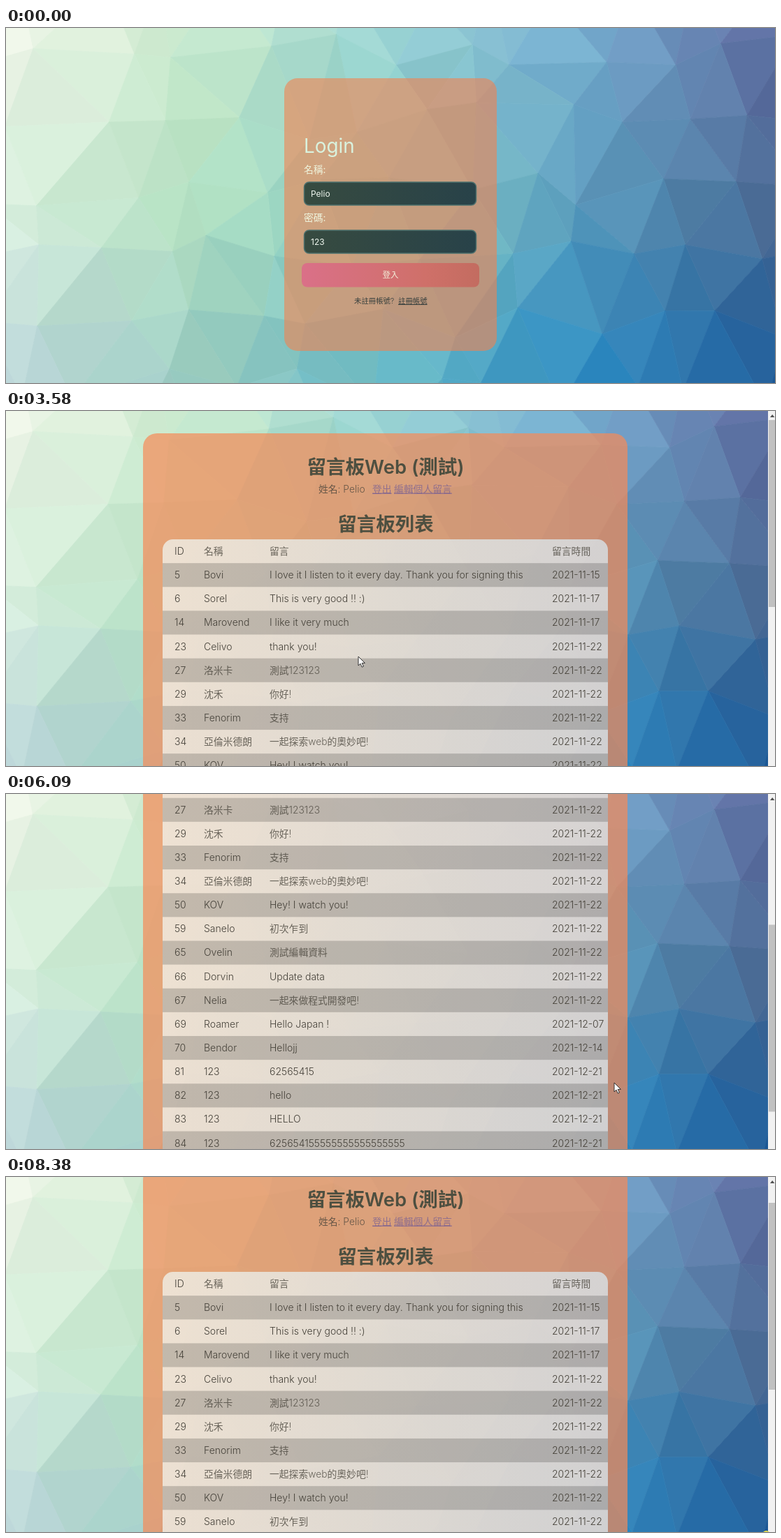
Recreate the animation shown at these times as an HTML page. Size 1100 by 509 pixels, loop 8.5 s.

```html
<!DOCTYPE html>
<html lang="zh-Hant">
<head>
<meta charset="utf-8">
<title>留言板</title>
<style>
html, body { margin: 0; width: 100%; height: 100%; overflow: hidden; }
svg { display: block; width: 100vw; height: 100vh; }
text { font-family: Inter, "Noto Sans CJK TC", "Noto Sans CJK", sans-serif; white-space: pre; }
.cell { font-size: 14px; font-weight: 300; fill: #46423a; }
.han { font-size: 13.8px; fill-opacity: .78; }
.link { fill: #7b6192; text-decoration: underline; }
.title { font-size: 27.5px; font-weight: 600; text-anchor: middle; fill: #4d4f40; }
.label { font-size: 13.8px; fill: #eff5de; }
.note { font-size: 10.4px; font-weight: 300; fill: #38403e; }
</style>
</head>
<body>
<svg viewBox="0 0 1100 509" preserveAspectRatio="none">
  <defs>
    <linearGradient id="field"><stop stop-color="#374b40"/><stop offset="1" stop-color="#284249"/></linearGradient>
    <linearGradient id="button"><stop stop-color="#da7088"/><stop offset=".7" stop-color="#cf7069"/><stop offset="1" stop-color="#c36c60"/></linearGradient>
    <linearGradient id="sheet"><stop stop-color="#f0f5f0"/><stop offset="1" stop-color="#d8e8f0"/></linearGradient>
    <clipPath id="round"><rect x="224" y="184" width="637" height="785" rx="15"/></clipPath>
  </defs>
  <g id="mesh"></g>
  <g id="login"></g>
  <g id="board">
    <g id="page"></g>
    <rect x="1090" width="10" height="509" fill="#f1f1f1"/>
    <path d="M1093 9l3.2-4 3.2 4z" fill="#505050"/>
    <rect id="thumb" x="1091" width="9" height="268" fill="#c1c1c1"/>
    <circle id="spot" cx="1087.5" cy="512.5" r="5.5" fill="#e6dc50"/>
  </g>
  <g id="cursor">
    <path id="arrow" d="M0 0V13L3 10.2 5.2 15.2 7.4 14.2 5.2 9.4H9.4Z" fill="#fff" stroke="#222" stroke-width=".9"/>
    <path id="beam" d="M-4 -7H4M0 -7V6M-4 6H4" fill="none" stroke="#4a5a5a" stroke-width="1.1"/>
    <path id="hand" d="M-1.5 1Q0 -1 1.5 1V6L6 7Q8 8 7.5 10L6 16H-1L-5 10Q-5 8 -3.5 8.5L-1.5 10Z" fill="#fff" stroke="#222" stroke-width=".9"/>
  </g>
</svg>
<script>
const LOOP = 8500, SWITCH = 3580, ROW = 785 / 23;
const $ = id => document.getElementById(id);
const clamp = (v, lo, hi) => Math.min(hi, Math.max(lo, v));
const mix = (a, b, k) => a + (b - a) * k;
const ease = k => k < .5 ? 4 * k ** 3 : 1 - 4 * (1 - k) ** 3;

let seed = 11;
const random = () => (seed = seed * 16807 % 2147483647) / 2147483647;

// Low-poly backdrop: jittered grid tinted by a coarse colour field
const palette = [
  "f4faed c8e9cc 98d2d3 76add0 5f6da2",
  "daf0de b4e2c2 84ccc4 5a9cbe 4a6a94",
  "bad4d8 98cbc0 66b8c8 2c8cc4 1a5896"
].map(row => row.split(" ").map(h => [0, 2, 4].map(i => parseInt(h.slice(i, i + 2), 16))));

function tint(x, y) {
  const u = clamp(x / 1100, 0, .999) * 4, v = clamp(y / 509, 0, .999) * 2;
  const i = Math.floor(u), j = Math.floor(v), lift = (random() - .5) * 10;
  const row = (r, k) => mix(palette[r][i][k], palette[r][i + 1][k], u - i);
  return `rgb(${[0, 1, 2].map(k => Math.round(mix(row(j, k), row(j + 1, k), v - j) + lift))})`;
}

function facet(...p) {
  const mid = k => (p[0][k] + p[1][k] + p[2][k]) / 3;
  const color = tint(mid(0), mid(1));
  return `<path d="M${p.join("L")}Z" fill="${color}" stroke="${color}" stroke-width=".7"/>`;
}

function backdrop() {
  const jitter = () => (random() - .5) * 56;
  const grid = Array.from({ length: 8 }, (_, j) => Array.from({ length: 14 }, (_, i) =>
    [i * 96 - 70 + (j % 2) * 40 + jitter(), j * 96 - 60 + jitter()]));
  let out = "";
  for (let j = 0; j < 7; j++) for (let i = 0; i < 13; i++) {
    const a = grid[j][i], b = grid[j][i + 1], c = grid[j + 1][i + 1], d = grid[j + 1][i];
    out += j % 2 ? facet(a, b, c) + facet(a, c, d) : facet(a, b, d) + facet(b, c, d);
  }
  return out;
}
$("mesh").innerHTML = backdrop();

const text = (x, y, s, cls, attrs = "") => `<text x="${x}" y="${y}" class="${cls}" ${attrs}>${s}</text>`;
const rect = (x, y, w, h, attrs) => `<rect x="${x}" y="${y}" width="${w}" height="${h}" ${attrs}/>`;
const cell = (x, y, s, cls = "") => text(x, y, s, `cell ${/[一-龥]/.test(s) ? "han" : ""} ${cls}`);

// Login page
const field = (y, id, value) =>
  rect(426.5, y, 246, 33, 'rx="7" fill="url(#field)"') +
  rect(426.5, y, 246, 33, `id="${id}" rx="7" fill="#c8e8e0"`) +
  rect(426.5, y, 246, 33, 'rx="7" fill="none" stroke="#4e716e" stroke-width="1.5"') +
  text(436, y + 20.5, value, "", 'font-size="12" fill="#eef6ee"');
$("login").innerHTML =
  rect(398, 72, 304, 391, 'rx="19" fill="rgb(243,130,80)" fill-opacity=".6"') +
  text(426, 179, "Login", "", 'font-size="27.8" fill="#d9f2de"') +
  text(426, 208, "名稱:", "label") + field(221, "name", "Pelio") +
  text(426, 277, "密碼:", "label") + field(290, "pass", "123") +
  rect(423, 337, 254, 34.5, 'rx="8" fill="url(#button)"') +
  rect(423, 337, 254, 34.5, 'id="press" rx="8" fill="#fff"') +
  text(550, 358, "登入", "", 'font-size="11.5" text-anchor="middle" fill="#f3f0da"') +
  text(498, 395, "未註冊帳號?", "note") +
  text(561, 395, "註冊帳號", "note", 'text-decoration="underline"');

// Message board
const rows = `ID|名稱|留言|留言時間
5|Bovi|I love it I listen to it every day. Thank you for signing this|2021-11-15
6|Sorel|This is very good !! :)|2021-11-17
14|Marovend|I like it very much|2021-11-17
23|Celivo|thank you!|2021-11-22
27|洛米卡|測試123123|2021-11-22
29|沈禾|你好!|2021-11-22
33|Fenorim|支持|2021-11-22
34|亞倫米德朗|一起探索web的奧妙吧!|2021-11-22
50|KOV|Hey! I watch you!|2021-11-22
59|Sanelo|初次乍到|2021-11-22
65|Ovelin|測試編輯資料|2021-11-22
66|Dorvin|Update data|2021-11-22
67|Nelia|一起來做程式開發吧!|2021-11-22
69|Roamer|Hello Japan !|2021-12-07
70|Bendor|Hellojj|2021-12-14
81|123|62565415|2021-12-21
82|123|hello|2021-12-21
83|123|HELLO|2021-12-21
84|123|625654155555555555555555|2021-12-21
86|Bendor|hello2|2021-12-22
87|Bendor|hello3|2021-12-22
88|Bendor|hello4|2021-12-22`.split("\n").map(r => r.split("|"));
const columns = [241, 283, 377, 781];
$("page").innerHTML =
  rect(196, 32, 693, 1000, 'rx="20" fill="rgb(247,138,88)" fill-opacity=".7"') +
  text(543, 90, "留言板Web (測試)", "title") +
  cell(447, 116.5, "姓名: Pelio") +
  cell(524, 116.5, "登出", "link") +
  cell(555, 116.5, "編輯個人留言", "link") +
  text(543, 171.5, "留言板列表", "title") +
  '<g clip-path="url(#round)">' + rect(224, 184, 637, 785, 'fill="url(#sheet)" fill-opacity=".75"') +
  rows.map((r, i) => {
    const y = 184 + i * ROW;
    return (i % 2 ? rect(224, y, 637, ROW, 'fill-opacity=".18"') : "") +
      r.map((s, k) => cell(columns[k], y + 22, s)).join("");
  }).join("") + "</g>";

// Motion: each move is [start, end, ...target], eased from the previous rest
const moves = [
  [0, 0, 1000, 507], [240, 1090, 650, 350], [1110, 1700, 560, 214], [1700, 1960, 510, 235],
  [1960, 2390, 481, 323], [2390, 2820, 499, 341], [3250, 3390, 504, 352],
  [4120, 4970, 870, 414], [7600, 7950, 1000, 520]
];
const spins = [[0, 0, 0], [5400, 6160, 350], [6330, 6590, 481.7], [6880, 7390, 150], [7560, 7950, 48]];
const boxes = { name: [221, 254], pass: [289, 324], press: [337, 371] };

function at(track, t) {
  let value = track[0].slice(2);
  for (const [from, to, ...goal] of track.slice(1)) {
    const k = ease(clamp((t - from) / (to - from), 0, 1));
    value = value.map((v, n) => mix(v, goal[n], k));
  }
  return value;
}

function over(id, t) {
  const [x, y] = at(moves, t), [top, bottom] = boxes[id];
  return x > 423 && x < 677 && y >= top && y <= bottom;
}

// Share of the last 250 ms spent over the box, which fades its highlight
function glow(id, t) {
  let hits = 0;
  for (let ago = 0; ago < 250; ago += 10) hits += over(id, t - ago);
  return hits / 25;
}

const show = (id, on) => $(id).setAttribute("display", on ? "inline" : "none");

function draw(t) {
  const login = t < SWITCH, [x, y] = at(moves, t), [scroll] = at(spins, t);
  show("login", login);
  show("board", !login);
  $("mesh").setAttribute("transform", `scale(${login ? 1 : 1090 / 1100})`);
  for (const id in boxes)
    $(id).setAttribute("fill-opacity", glow(id, t) * (id === "press" ? .15 : .26));
  $("page").setAttribute("transform", `translate(0 ${-scroll})`);
  $("thumb").setAttribute("y", 13 + scroll / 2);
  show("spot", t >= 8380);

  const target = login && Object.keys(boxes).find(id => over(id, t));
  const kind = !target ? "arrow" : target === "press" ? "hand" : "beam";
  for (const id of ["arrow", "beam", "hand"]) show(id, id === kind);
  show("cursor", t >= 240 && t < 7950);
  $("cursor").setAttribute("transform", `translate(${x} ${y})`);
}

const start = performance.now();
function tick() {
  draw((performance.now() - start) % LOOP);
  requestAnimationFrame(tick);
}
tick();
</script>
</body>
</html>
```
